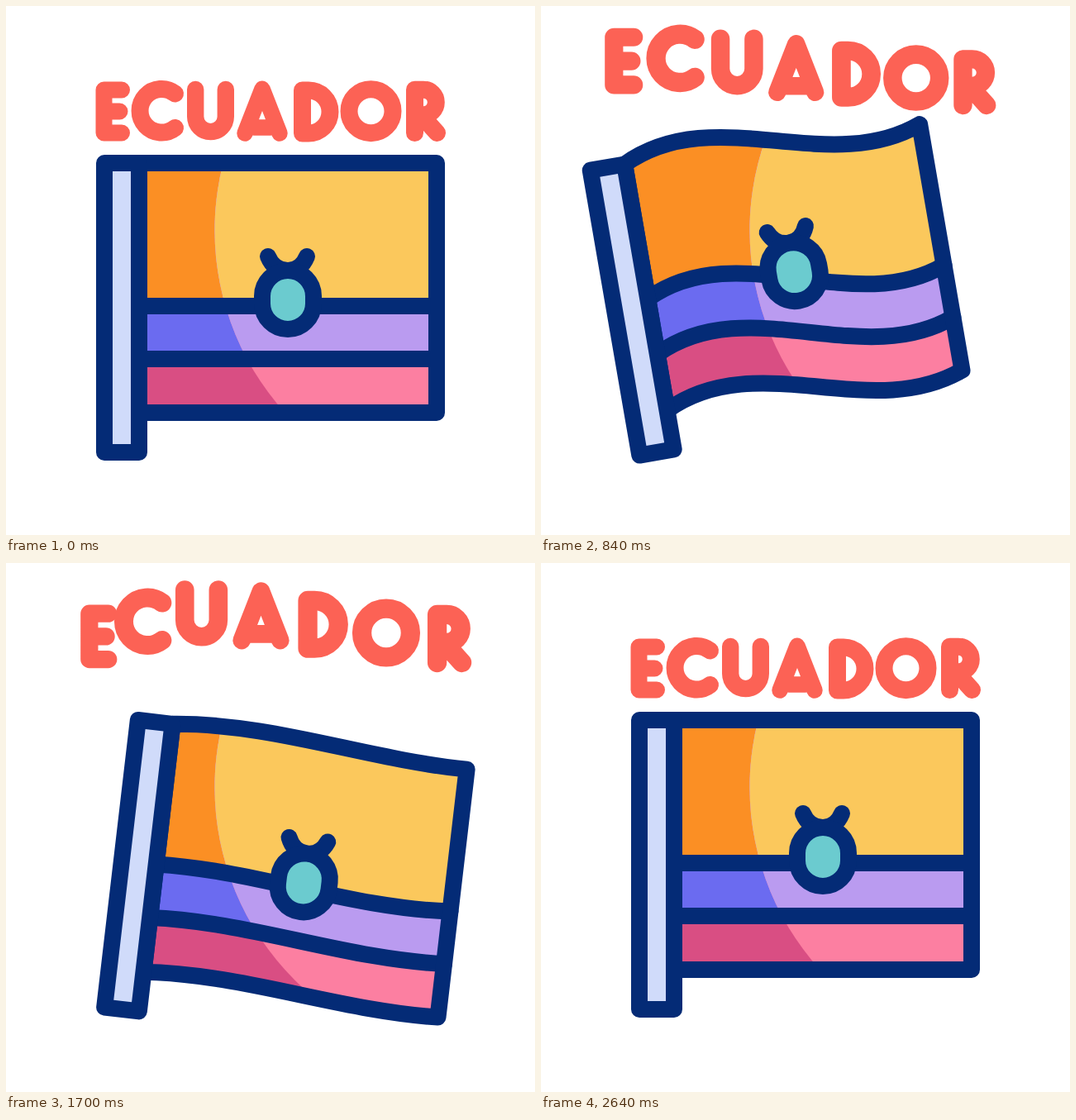
An HTML page that plays this animation: 640x640 px, repeating every 3 s.

```html
<!DOCTYPE html>
<html lang="en">
<head>
<meta charset="utf-8">
<title>Ecuador flag</title>
<style>
  html, body { margin: 0; width: 100%; height: 100%; overflow: hidden; background: #fff; }
  svg { display: block; width: 100vw; height: 100vh; }
  .ink { fill: none; stroke: #042b76; stroke-width: 20; stroke-linecap: round; stroke-linejoin: round; }
  #word { fill: none; stroke: #fc6255; stroke-width: 21; stroke-linecap: round; stroke-linejoin: round; }
</style>
</head>
<body>
<svg viewBox="0 0 640 640" role="img" aria-label="ECUADOR">
  <clipPath id="light"><circle cx="582" cy="271.3" r="329.5"/></clipPath>

  <g class="spin">
    <path class="b2" fill="#d94e83"/>
    <path class="b1" fill="#6b6bf0"/>
    <path class="b0" fill="#fb8f24"/>
  </g>
  <g clip-path="url(#light)">
    <g class="spin">
      <path class="b2" fill="#fc7fa1"/>
      <path class="b1" fill="#ba9bf0"/>
      <path class="b0" fill="#fbc85c"/>
    </g>
  </g>
  <g class="spin ink">
    <path id="lines"/>
    <path class="b2"/>
    <rect x="119" y="190" width="42" height="350" fill="#d0dbfa"/>
    <g id="emblem">
      <path d="M317 303Q324 320 341 320Q357 320 364 303"/>
      <rect x="310" y="320" width="62" height="71" rx="31" fill="#6bcbcf"/>
    </g>
  </g>

  <g id="word">
    <path data-x="129" d="M140 101.500H118.500V153.500H140M118.500 127.500H137.500" stroke-width="20"/>
    <path data-x="183" d="M204.500 106A26.300 26.300 0 1 0 204.500 147.500"/>
    <path data-x="247.5" d="M229.200 101V133.800a18.300 18.300 0 0 0 36.600 0V101" stroke-width="20.400"/>
    <path data-x="310" d="M289 154L310 100.300L331 154M300 147H320" stroke-width="19.500"/>
    <path data-x="375.5" d="M358.500 102H366a26 26 0 0 1 0 52H358.500Z"/>
    <path data-x="441.5" d="M415 127.200a26.500 26.500 0 1 0 53 0a26.500 26.500 0 1 0-53 0Z"/>
    <path data-x="508" d="M494.500 153.500V101.200H505a15.300 15.300 0 0 1 0 30.600H497M504 134L521.500 153.500"/>
  </g>
</svg>

<script>
const LOOP = 3000;
const all = s => [...document.querySelectorAll(s)];
const spins = all('.spin');
const bands = [0, 1, 2].map(i => all('.b' + i));
const lines = document.getElementById('lines');
const emblem = document.getElementById('emblem');
const letters = all('#word path');

// Eased value at time t from [time, value] keys.
function track(t, keys) {
  if (t <= keys[0][0]) return keys[0][1];
  for (let i = 1; i < keys.length; i++) {
    const [t0, a] = keys[i - 1], [t1, b] = keys[i];
    if (t < t1) {
      const p = (t - t0) / (t1 - t0);
      return a + (b - a) * p * p * (3 - 2 * p);
    }
  }
  return keys[keys.length - 1][1];
}

const swing = [[200, 0], [900, -10], [1605, 8.2], [2095, -7], [2625, 0]];

// Cloth values at its four poses: three waves, then rest.
const cloth = (t, a, b, c) => track(t, [[200, 0], [830, a], [1370, b], [1880, c], [2640, 0]]);

function drawFlag(t) {
  const w = cloth(t, -58, 62, -46), d = cloth(t, 13, 13, 13);

  // Wavy horizontal: lift raises its left end, sag bends its middle.
  const edge = (y, lift, sag2, sag3) => {
    const s = cloth(t, lift, lift, 0), m = cloth(t, 0, sag2, sag3);
    return [
      [161, y + s],
      [281, y + s + m + w],
      [401, y + m - w],
      [521, y + d]
    ];
  };
  const curve = ([a, b, c, e]) => `${a}C${b} ${c} ${e}`;
  const top = edge(190, 0, 0, 0), mid = edge(363, -8, -3, 13);
  const low = edge(427, -4, 11, 4), bottom = edge(492, 0, 13, 0);

  [mid, low, bottom].forEach((e, i) => {
    const path = `M${curve(top)}L${curve([...e].reverse())}Z`;
    bands[i].forEach(el => el.setAttribute('d', path));
  });
  lines.setAttribute('d', `M${curve(mid)}M${curve(low)}`);

  const [a, b, c, e] = mid.map(p => p[1]);
  emblem.setAttribute('transform', `translate(0 ${(a + 3 * b + 3 * c + e) / 8 - 363})`);

  const turn = `rotate(${track(t, swing)} 140 540)`;
  spins.forEach(el => el.setAttribute('transform', turn));
}

function drawWord(t) {
  letters.forEach((el, i) => {
    const x = +el.dataset.x, y = 127.5, late = 100 * i;
    const peak = 775 + 95 * i, high = 1475 + late, end = 1985 + late;
    const cy = track(t, [[200, y], [peak, 63 + 0.8 * i], [1075 + late, 92], [high, 61.5], [end, y]]);
    const grow = track(t, [[200, 0], [peak, 1], [high, 1], [end, 0]]);
    const cx = x + (x - 320) * 0.152 * grow;
    el.setAttribute('transform',
      `translate(${cx} ${cy}) scale(${1 + 0.11 * grow}) translate(${-x} ${-y})`);
  });
}

function frame() {
  const t = performance.now() % LOOP;
  drawFlag(t);
  drawWord(t);
  requestAnimationFrame(frame);
}
frame();
</script>
</body>
</html>
```
